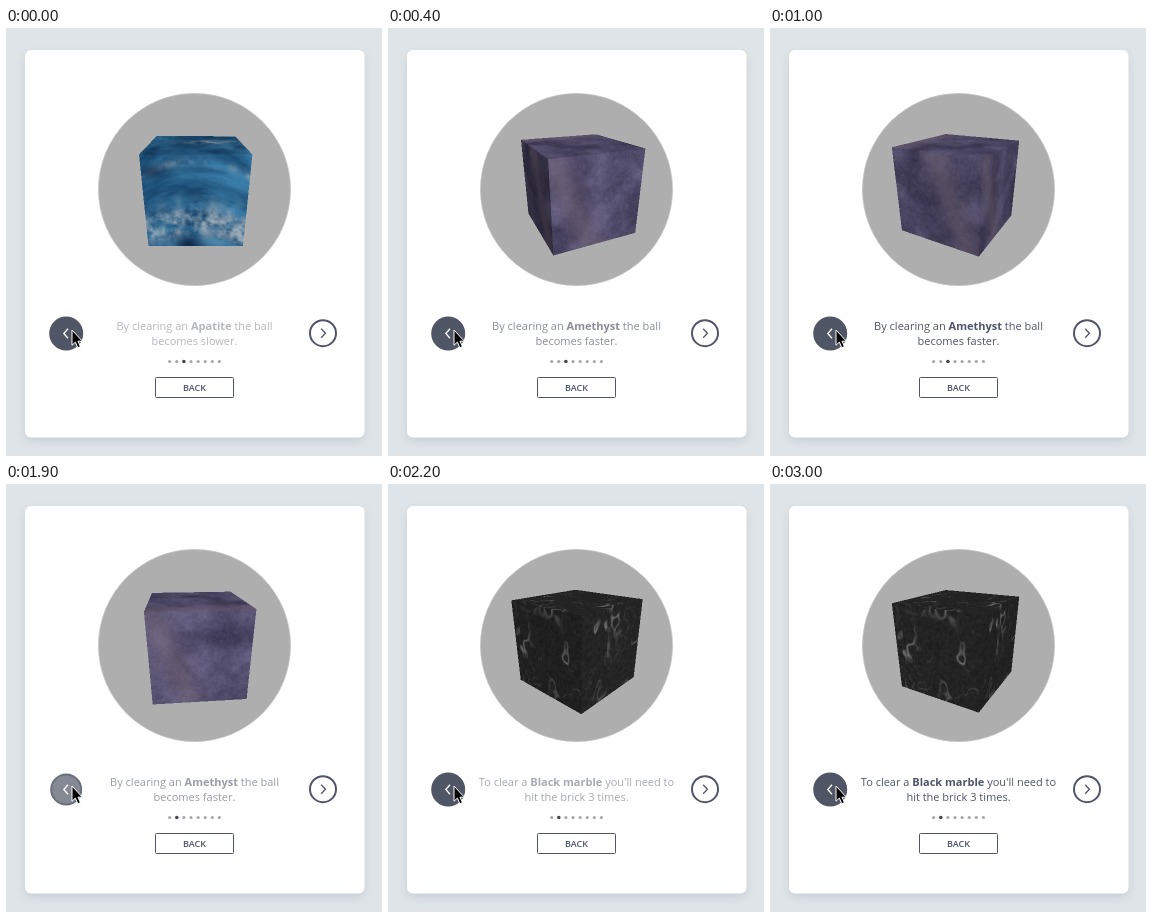
An HTML page with a canvas for the animation above (3.6 s loop, 376 px wide and 428 px high).

```html
<!DOCTYPE html>
<html lang="en">
<head>
<meta charset="utf-8">
<style>
  html, body { margin: 0; width: 100%; height: 100%; overflow: hidden; background: #dfe4e8; }
  svg, canvas { position: absolute; left: 0; top: 0; width: 376px; height: 428px; }
  text { font-family: "Open Sans", "Noto Sans", sans-serif; text-anchor: middle; fill: #50546a; }
  #label { font-size: 11px; }
  #label .name { font-weight: 700; }
  .card { fill: #fff; filter: drop-shadow(0 4px 4px rgba(90, 110, 130, .16)); }
  .line { fill: none; stroke: #51546a; }
</style>
</head>
<body>
<svg viewBox="0 0 376 428">
  <rect class="card" x="19" y="22" width="339.5" height="387.5" rx="6"/>
  <circle cx="188.5" cy="161.5" r="96" fill="#aeaeae" stroke="#c2c2c2" stroke-width=".8"/>
  <circle id="prev" cx="60.2" cy="305.5"/>
  <path d="M62 300.8l-4.2 4.7 4.2 4.7" fill="none" stroke="#fff" stroke-width="1.3"/>
  <circle class="line" cx="317" cy="305.2" r="13" stroke-width="2"/>
  <path class="line" d="M315.2 300.8l4.2 4.5-4.2 4.5" stroke-width="1.3"/>
  <text id="label"><tspan x="188.5" y="302"><tspan></tspan><tspan class="name"></tspan><tspan></tspan></tspan><tspan x="188.5" y="317"></tspan></text>
  <g id="dots"></g>
  <rect class="line" x="149.5" y="349.5" width="78" height="20" rx="1"/>
  <text x="188.5" y="363" font-size="9" font-weight="600">BACK</text>
  <path d="M66 302v15.2l3.4-3.1 2.4 5.6 2.6-1.1-2.4-5.4h4.4z" fill="#000" stroke="#fff" stroke-width="1"/>
</svg>
<canvas width="376" height="428"></canvas>
<script>
const $ = s => document.querySelector(s);
const clamp = x => Math.max(0, Math.min(1, x));
const mix = (a, b, k) => a.map((v, i) => v + (b[i] - v) * k);
const bell = (x, w) => Math.exp(-x * x / (w * w));

// --- smooth value noise ---
function hash(x, y, z) {
  let h = Math.imul(x, 374761393) + Math.imul(y, 668265263) + Math.imul(z, 1442695041) | 0;
  h = Math.imul(h ^ h >>> 13, 1274126177);
  h = Math.imul(h ^ h >>> 15, 739982445);
  return ((h ^ h >>> 16) >>> 0) / 2 ** 32;
}
const lerp = (a, b, k) => a + (b - a) * k;
const soft = k => k * k * (3 - 2 * k);
function noise(x, y, z) {
  const i = Math.floor(x), j = Math.floor(y), k = Math.floor(z);
  const u = soft(x - i), v = soft(y - j), w = soft(z - k);
  const row = (b, c) => lerp(hash(i, b, c), hash(i + 1, b, c), u);
  const sheet = c => lerp(row(j, c), row(j + 1, c), v);
  return lerp(sheet(k), sheet(k + 1), w);
}
function fbm(x, y, z, octaves) {
  let sum = 0, amp = .5, total = 0;
  for (let n = 0; n < octaves; n++) {
    sum += amp * noise(x, y, z);
    total += amp;
    amp *= .55;
    x = x * 2.03 + 7; y = y * 2.03 + 3; z = z * 2.03 + 5;
  }
  return sum / total;
}

// --- stones: colour of a point on the cube; axis is the face it lies on ---
function apatite([x, y, z], axis) {
  const arch = y + .3 * x * x;
  const band = clamp((fbm(x * 1.3, arch * 5, z * 1.3, 4) - .5) * 2.4 + .5);
  const grain = fbm(x * 6, y * 6, z * 6, 3);
  let c = mix([22, 66, 104], [56, 122, 164], band);
  const pale = axis === 1
    ? bell(x - .35, .6) * bell(z + .2, .25)
    : bell(arch + .38, .38) + .5 * bell(arch - .85, .08);
  c = mix(c, [150, 166, 180], clamp(pale * (grain * 2.4 - .65)));
  const dark = bell(x + .15, .3) * bell(y + .95, .25) + .7 * bell(x + .8, .3) * bell(y - .65, .14);
  return mix(c, [14, 42, 74], clamp(dark));
}

function amethyst([x, y, z], axis) {
  const blotch = clamp((fbm(x * 2.2, y * 2.2, z * 2.2, 4) - .5) * 2.2 + .5);
  const grain = noise(x * 26, y * 26, z * 26);
  let c = mix([57, 53, 80], [103, 97, 131], blotch * .75 + grain * .25);
  const across = axis === 0 ? -x * z : axis === 2 ? x * z : x;
  const offset = axis === 2 ? .4 : -.55;
  const streak = bell(across - offset + .4 * y, .3);
  return mix(c, [125, 108, 124], streak * .45);
}

function marble([x, y, z]) {
  const vein = (f, s) => {
    const d = Math.abs(fbm(x * f + s, y * f * .7 + s, z * f + s, 4) - .5);
    return clamp(1 - d / .022) * clamp(noise(x * 2 + s, y * 2, z * 2) * 2.6 - .9);
  };
  const grain = noise(x * 22, y * 22, z * 22);
  const g = 33 + 13 * grain + 85 * vein(1.15, 4.3) + 30 * vein(2.1, 17.6);
  return [g, g, g];
}

const stones = [
  { paint: apatite, text: ["By clearing an ", "Apatite", " the ball", "becomes slower."] },
  { paint: amethyst, text: ["By clearing an ", "Amethyst", " the ball", "becomes faster."] },
  { paint: marble, text: ["To clear a ", "Black marble", " you'll need to", "hit the brick 3 times."] }
];

// --- cube, cast ray by ray at double size ---
const view = { x: 115, y: 98, w: 150, h: 142, scale: 2 };
const focus = 234, midX = 189.8, midY = 175.7, far = 5.445, lift = .411;
const half = [1, .97, 1];
const tilt = 25 * Math.PI / 180, tc = Math.cos(tilt), ts = Math.sin(tilt);
const ctx = $("canvas").getContext("2d");
const buffer = document.createElement("canvas");
buffer.width = view.w * view.scale;
buffer.height = view.h * view.scale;
const bufferCtx = buffer.getContext("2d");

function drawCube(paint, degrees) {
  const yaw = (degrees - 45) * Math.PI / 180, c = Math.cos(yaw), s = Math.sin(yaw);
  const turn = (x, y, z) => [x * c - z * s, y, x * s + z * c];
  const eye = turn(0, far * ts - lift * tc, far * tc + lift * ts);
  const image = bufferCtx.createImageData(buffer.width, buffer.height);

  // light comes from the front, a little to the right
  const shade = (axis, side) => {
    if (axis === 1) return .9;
    const angle = yaw + (axis ? 0 : Math.PI / 2) + (side < 0 ? Math.PI : 0);
    return .47 + .56 * Math.max(0, Math.cos(angle - .21));
  };

  for (let py = 0, at = 0; py < buffer.height; py++) {
    for (let px = 0; px < buffer.width; px++, at += 4) {
      const sx = (view.x + (px + .5) / view.scale - midX) / focus;
      const sy = (midY - view.y - (py + .5) / view.scale) / focus;
      const dir = turn(sx, sy * tc - ts, -sy * ts - tc);
      let near = -1e9, end = 1e9, axis = 0;
      for (let i = 0; i < 3; i++) {
        const reach = Math.abs(half[i] / dir[i]), mid = -eye[i] / dir[i];
        if (mid - reach > near) { near = mid - reach; axis = i; }
        end = Math.min(end, mid + reach);
      }
      if (near > end) continue;
      const point = eye.map((e, i) => e + dir[i] * near);
      const light = shade(axis, point[axis]);
      paint(point, axis).forEach((v, i) => image.data[at + i] = v * light);
      image.data[at + 3] = 255;
    }
  }
  bufferCtx.putImageData(image, 0, 0);
  ctx.clearRect(0, 0, 376, 428);
  ctx.imageSmoothingQuality = "high";
  ctx.drawImage(buffer, view.x, view.y, view.w, view.h);
}

// --- timeline ---
$("#dots").innerHTML = Array.from({ length: 8 }, (_, i) =>
  `<circle cx="${163.7 + i * 7.1}" cy="333.5"/>`).join("");
const dots = [...document.querySelectorAll("#dots circle")];
const spans = [...document.querySelectorAll("#label > tspan > tspan, #label > tspan:last-child")];
const secondClick = 1900;

function textAlpha(t) {
  if (t < 200) return .42 - .0027 * t;
  if (t < secondClick) return clamp((t - 200) / 300);
  if (t < 2100) return .58 - .003 * (t - secondClick);
  return clamp((t - 2060) / 280);
}

// one full turn that overshoots and swings back
function angle(t) {
  const rest = Math.max(0, t < secondClick ? .693 - .00076 * t : .821 - .00076 * (t - secondClick));
  return 15.3 - 360 * rest * rest * (1.7 - 2.7 * rest);
}

let lastStep = -1, lastPose = "";
function render(t) {
  const index = t < 200 ? 0 : t < 2100 ? 1 : 2;
  const stone = stones[index], degrees = angle(t), pose = index + ":" + degrees;
  if (pose !== lastPose) drawCube(stone.paint, degrees);
  lastPose = pose;

  spans.forEach((span, i) => span.textContent = stone.text[i]);
  $("#label").setAttribute("opacity", textAlpha(t));

  const active = t < secondClick ? 2 : 1;
  dots.forEach((dot, i) => {
    dot.setAttribute("r", i === active ? 1.8 : 1.6);
    dot.setAttribute("fill", i === active ? "#45454f" : "#a6a6ac");
  });

  const pressed = t === secondClick, prev = $("#prev");
  prev.setAttribute("r", pressed ? 15 : 16);
  prev.setAttribute("fill", pressed ? "#858993" : "#505666");
  prev.setAttribute("stroke", pressed ? "#6c707e" : "#505666");
  prev.setAttribute("stroke-width", 2);
}

function tick() {
  const step = Math.floor(performance.now() % 3600 / 100);
  if (step !== lastStep) render(step * 100);
  lastStep = step;
  requestAnimationFrame(tick);
}
tick();
</script>
</body>
</html>
```
